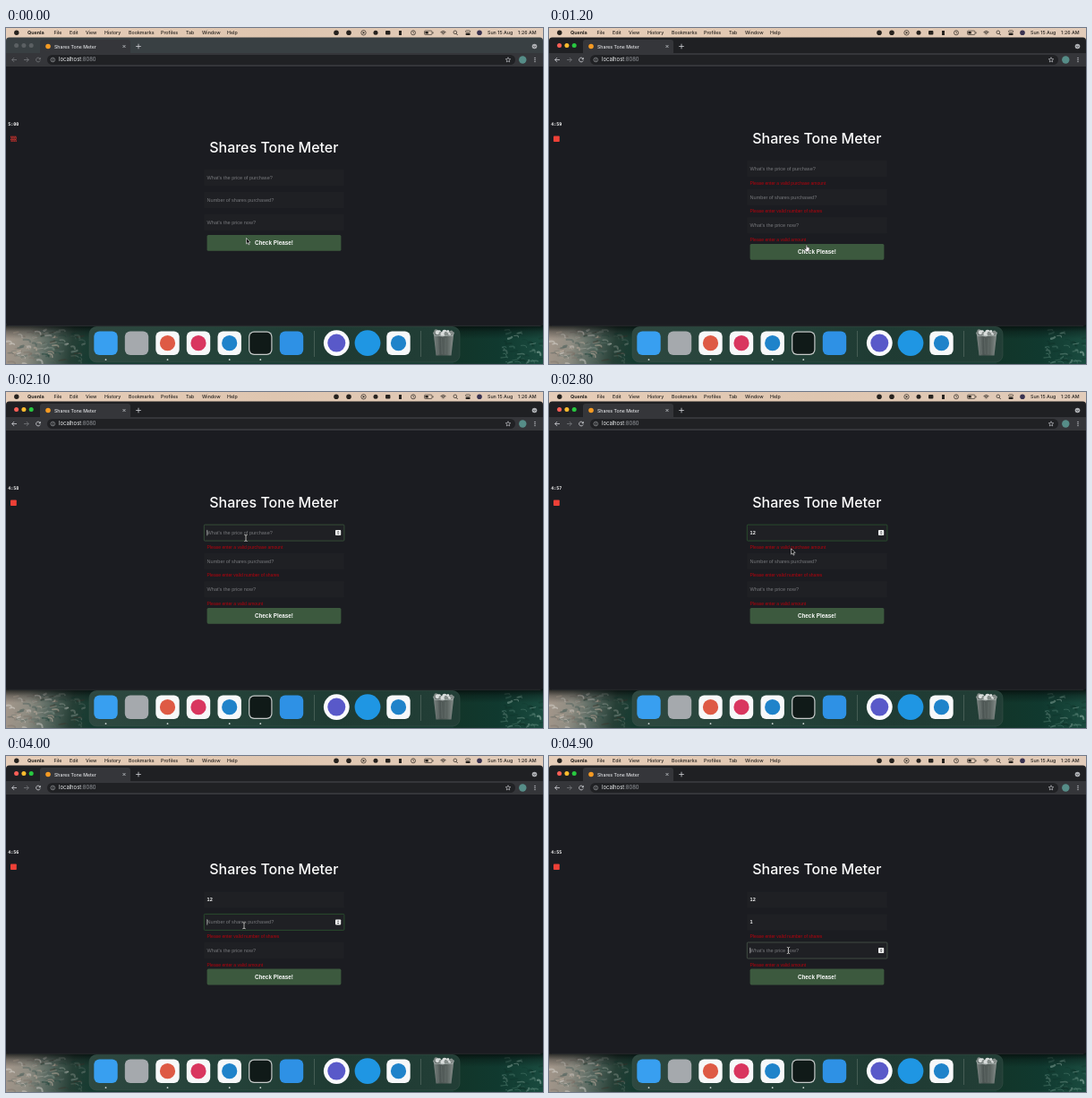
An HTML page with a canvas for the animation above (5000 ms loop, 600 by 375 pixels).

```html
<!DOCTYPE html>
<html lang="en">
<head>
<meta charset="utf-8">
<title>Shares Tone Meter</title>
<style>
html, body { margin: 0; width: 100%; height: 100%; overflow: hidden; background: #1b1c20; }
canvas { display: block; width: 600px; height: 375px; }
</style>
</head>
<body>
<canvas id="stage"></canvas>
<script>
const W = 600, H = 375, LOOP = 5000, STEP = 100;
const UI = 'Inter, "Open Sans", sans-serif';
const FORM = '"Liberation Sans", Arial, sans-serif';
const MONO = '"DejaVu Sans Mono", monospace';
const TITLE = 'Shares Tone Meter';

const canvas = document.getElementById('stage');
const ratio = window.devicePixelRatio || 1;
canvas.width = W * ratio;
canvas.height = H * ratio;
const c = canvas.getContext('2d');

const FIELDS = [
  { hint: "What's the price of purchase?", error: 'Please enter a valid purchase amount' },
  { hint: 'Number of shares purchased?', error: 'Please enter valid number of shares' },
  { hint: "What's the price now?", error: 'Please enter a valid amount' }
];
const SUBMITS = [700, 3200];
const FOCUS = [
  { from: 1900, to: 3200, field: 0 },
  { from: 3700, to: 4800, field: 1 },
  { from: 4800, to: 5000, field: 2 }
];
const KEYS = [
  { at: 2500, field: 0, text: '1' },
  { at: 2700, field: 0, text: '12' },
  { at: 4300, field: 1, text: '1' }
];
// time, x, y of the pointer hot spot
const PATH = [
  [0, 268.5, 234.5], [400, 270.3, 237.5], [700, 287, 241.8], [1300, 288, 242],
  [1800, 268, 163], [2700, 268, 163], [3100, 284.3, 238.2], [3400, 284.3, 238.2],
  [3700, 266, 189], [4400, 266, 189.5], [4700, 267.5, 217], [5000, 267.5, 217]
];

function box(x, y, w, h, r, fill, stroke, lw = 0.6) {
  c.beginPath();
  c.roundRect(x, y, w, h, r);
  if (fill) { c.fillStyle = fill; c.fill(); }
  if (stroke) { c.strokeStyle = stroke; c.lineWidth = lw; c.stroke(); }
}

function dot(x, y, r, fill, stroke, lw = 0.7) {
  c.beginPath();
  c.arc(x, y, r, 0, Math.PI * 2);
  if (fill) { c.fillStyle = fill; c.fill(); }
  if (stroke) { c.strokeStyle = stroke; c.lineWidth = lw; c.stroke(); }
}

function line(points, color, lw = 0.8) {
  c.beginPath();
  points.forEach(([x, y]) => c.lineTo(x, y));
  c.strokeStyle = color;
  c.lineWidth = lw;
  c.stroke();
}

function poly(points, fill, stroke, lw = 0.6) {
  c.beginPath();
  points.forEach(([x, y]) => c.lineTo(x, y));
  c.closePath();
  c.fillStyle = fill;
  c.fill();
  if (stroke) { c.strokeStyle = stroke; c.lineWidth = lw; c.stroke(); }
}

function text(s, x, y, font, color, align = 'left') {
  c.font = font;
  c.fillStyle = color;
  c.textAlign = align;
  c.textBaseline = 'alphabetic';
  c.fillText(s, x, y);
}

function fade(x0, y0, x1, y1, ...colors) {
  const g = c.createLinearGradient(x0, y0, x1, y1);
  colors.forEach((color, i) => g.addColorStop(i / (colors.length - 1), color));
  return g;
}

function random(seed) {
  return () => (seed = (seed * 16807) % 2147483647) / 2147483647;
}

// short wavy strokes scattered over a strip of coast
function foam(seed, count, x, width, colors, alpha) {
  const rnd = random(seed);
  for (let i = 0; i < count; i++) {
    const px = x + rnd() * width, py = 337 + rnd() * 38;
    const dx = 2 + rnd() * 6, dy = rnd() * 6 - 2;
    c.beginPath();
    c.moveTo(px, py);
    c.quadraticCurveTo(px + dx, py - 1, px + dx, py + dy);
    c.strokeStyle = colors[i % colors.length];
    c.lineWidth = 0.6 + rnd() * 1.8;
    c.globalAlpha = alpha * (0.4 + rnd() * 0.6);
    c.stroke();
  }
  c.globalAlpha = 1;
}

function wallpaper() {
  c.fillStyle = '#143a30';
  c.fillRect(0, 325, W, 50);
  c.fillStyle = fade(0, 345, 98, 360, '#a3968a', '#8f8d83', '#56675f', '#263f36', '#143a30');
  c.fillRect(0, 325, 100, 50);
  c.fillStyle = fade(500, 0, W, 0, '#123529', '#10392f', '#1a4b3f');
  c.fillRect(500, 325, 100, 50);
  c.lineCap = 'round';
  foam(71, 60, 0, 52, ['#d6d2cc', '#796e65', '#bfae9f', '#4c605b'], 0.65);
  foam(43, 42, 38, 48, ['#6f8279', '#173d34', '#a2aaa2', '#3d352c'], 0.6);
  foam(29, 44, 553, 45, ['#6f9d8e', '#0f3028', '#a2c0b4'], 0.5);
  c.lineCap = 'butt';
  c.fillStyle = fade(0, 331, 0, 347, 'rgba(4,8,8,0.85)', 'rgba(4,8,8,0.3)', 'rgba(4,8,8,0)');
  c.fillRect(0, 331, W, 16);
}

function menuBar() {
  c.fillStyle = fade(0, 0, W, 0, '#e6cdb8', '#dfc6b0', '#e2ccba');
  c.fillRect(0, 0, W, 16);
  const ink = '#26221e';
  dot(11.8, 5.2, 2.7, ink);
  text('Quenla', 24, 7.1, `700 5.4px ${UI}`, ink);
  [['File', 53.5], ['Edit', 71], ['View', 89], ['History', 110], ['Bookmarks', 137],
   ['Profiles', 173], ['Tab', 201], ['Window', 219], ['Help', 247]]
    .forEach(([s, x]) => text(s, x, 7.1, `500 5.3px ${UI}`, ink));
  dot(369, 5.3, 2.8, ink);
  dot(383, 5.3, 2.8, ink);
  dot(399.5, 5.3, 2.7, null, ink);
  poly([[398.7, 3.9], [401, 5.3], [398.7, 6.7]], ink);
  dot(413, 5.3, 2.5, ink);
  box(424, 3, 5.4, 4.6, 1, ink);
  box(439, 3, 3, 5, 0, ink);
  dot(455, 5.3, 2.5, null, ink);
  line([[455, 3.6], [455, 5.4], [456.2, 6]], ink, 0.6);
  box(467.5, 3.1, 8.5, 4.4, 1, null, ink);
  box(468.4, 4, 3.4, 2.6, 0.4, ink);
  line([[477, 4.5], [477, 6.2]], ink);
  for (const r of [1.2, 2.8, 4.4]) {
    c.beginPath();
    c.arc(488.5, 8, r, -2.3, -0.84);
    c.strokeStyle = ink;
    c.lineWidth = 0.9;
    c.stroke();
  }
  dot(501.8, 4.8, 1.8, null, ink);
  line([[503, 6.2], [504.7, 8]], ink);
  box(513.5, 2.8, 5.2, 2.1, 1, null, ink);
  box(513.5, 5.8, 5.2, 2.1, 1, ink);
  dot(529, 5.3, 2.8, '#393250');
  text('Sun 15 Aug', 538, 7.1, `500 5.3px ${UI}`, ink);
  text('1:26 AM', 592.5, 7.1, `500 5.3px ${UI}`, ink, 'right');
}

function browser(active) {
  box(0, 10.5, W, 322, 3.5, active ? '#1f2023' : '#394043');
  const bar = '#35363a';
  box(38, 13, 101, 18, 3, bar);
  c.fillStyle = bar;
  c.fillRect(0, 28, W, 15);
  const lights = active ? ['#fe5f57', '#febc2e', '#28c840'] : ['#5b6063', '#5b6063', '#5b6063'];
  lights.forEach((color, i) => dot(11.6 + i * 8.3, 19.5, 2.5, color));

  dot(47, 20.5, 2.8, '#f59a23');
  text(TITLE, 54, 22.6, `500 5.2px ${UI}`, '#e0e1e4');
  const ink = '#d2d4d8', dim = '#77797d', nav = active ? ink : dim;
  line([[130.5, 19], [133.5, 22]], ink, 0.7);
  line([[133.5, 19], [130.5, 22]], ink, 0.7);
  line([[145.2, 20.5], [150.8, 20.5]], ink);
  line([[148, 17.7], [148, 23.3]], ink);
  dot(590.5, 20.5, 2.8, '#aeb0b4');
  line([[589.2, 20], [590.5, 21.4], [591.8, 20]], '#303134', 0.7);

  line([[12, 35.5], [6.7, 35.5]], nav);
  line([[9.2, 33], [6.7, 35.5], [9.2, 38]], nav);
  line([[20, 35.5], [25.3, 35.5]], dim);
  line([[22.8, 33], [25.3, 35.5], [22.8, 38]], dim);
  c.beginPath();
  c.arc(36, 35.5, 2.4, 0.4, 5.5);
  c.strokeStyle = nav;
  c.lineWidth = 0.8;
  c.stroke();
  poly([[38.7, 32.7], [38.7, 35.2], [36.3, 35.2]], nav);

  box(46, 30, 523, 11, 5.5, '#202124');
  dot(52.3, 35.5, 2.3, null, '#b2b5b9', 0.6);
  line([[52.3, 35.1], [52.3, 36.8]], '#b2b5b9', 0.6);
  c.fillStyle = '#b2b5b9';
  c.fillRect(52, 34, 0.6, 0.6);
  const font = `400 5.9px ${UI}`;
  text('localhost', 59, 37.4, font, '#eceef0');
  text(':8080', 59 + c.measureText('localhost').width, 37.4, font, '#9a9da2');

  const star = [];
  for (let i = 0; i < 10; i++) {
    const a = -Math.PI / 2 + i * Math.PI / 5, r = i % 2 ? 1.3 : 2.9;
    star.push([561 + r * Math.cos(a), 35.6 + r * Math.sin(a)]);
  }
  poly(star, '#202124', ink, 0.6);
  dot(577.3, 35.5, 4.2, '#568d88');
  for (let i = -1; i < 2; i++) dot(591, 35.5 + i * 2.1, 0.7, ink);

  box(0, 43, W, 289.5, [0, 0, 3.5, 3.5], '#1b1c21');
  line([[3, 332.3], [597, 332.3]], '#3a3e40', 0.4);
}

function dock() {
  box(93, 333.5, 414, 39.5, 8, fade(93, 0, 507, 0, '#2e4840', '#25433a', '#1f3b33', '#223e36'), '#3d544c', 0.5);
  const tile = (x, fill) => box(x - 13.2, 338.5, 26.4, 26.4, 6, fill);
  tile(111.5, '#389ff0');
  tile(146, '#a5a9ad');
  [[180.5, '#de5a45'], [215, '#d9365f'], [249.7, '#1f83ca'], [438.5, '#1f83ca']].forEach(([x, color]) => {
    tile(x, '#f7f8f9');
    dot(x, 351.7, 8.6, color);
  });
  tile(284.3, '#c5c9c8');
  box(272.3, 339.7, 24, 24, 5, '#101a18');
  tile(319, '#2e91e5');
  dot(369.3, 351.6, 14.4, '#fafafd');
  dot(369.3, 351.6, 10, '#5959c9');
  dot(404, 351.6, 14.4, '#1f96e3');
  line([[344.5, 338], [344.5, 367]], '#566c64', 0.7);
  line([[463.5, 338], [463.5, 367]], '#566c64', 0.7);
  [111.5, 180.5, 249.7, 284.3].forEach(x => dot(x, 370.2, 0.9, '#d0d8d5'));

  // bin with crumpled paper
  poly([[477.5, 339], [500.5, 339], [497.5, 365.5], [480.5, 365.5]],
    fade(478, 0, 500, 0, '#7d8583', '#4c5553', '#59625f', '#858d8a'));
  for (let i = 0; i < 4; i++) line([[482 + i * 4.6, 346], [483.5 + i * 3.7, 364]], '#69736f', 0.6);
  const rnd = random(19);
  for (let i = 0; i < 10; i++) {
    dot(480.5 + i * 1.9, 338.5 + rnd() * 3.5, 1.5 + rnd() * 1.4, i % 3 ? '#d9dddc' : '#858d8a');
  }
  line([[477.5, 340], [479, 343.5], [499, 343.5], [500.5, 340]], '#aab3b0', 0.7);
}

function recorder(t) {
  const left = 300 - Math.max(0, Math.floor((t + 300) / 1000));
  const clock = Math.floor(left / 60) + ':' + String(left % 60).padStart(2, '0');
  text(clock, 2.2, 108.7, `700 5.05px ${MONO}`, '#f5f5f5');
  if (t >= STEP) {
    box(5, 120.5, 6.8, 6.6, 0.8, '#ee4037');
    return;
  }
  box(5, 120.5, 6.8, 6.6, 0.8, '#551f21');
  c.fillStyle = '#d93c36';
  for (let i = 0; i < 16; i++) {
    const row = i >> 2;
    c.fillRect(5.1 + (i % 4) * 1.7 + (row % 2) * 0.7, 120.8 + row * 1.6, 1, 1);
  }
}

function layout(t) {
  const values = ['', '', ''];
  KEYS.forEach(k => { if (t >= k.at) values[k.field] = k.text; });
  const bad = FIELDS.map((_, i) => t >= SUBMITS[1] ? i > 0 : t >= SUBMITS[0]);
  const extra = 6.6 * bad.filter(Boolean).length;
  const titleY = 133 - extra / 2;
  let y = titleY + 34;
  const rows = bad.map(b => {
    const row = y;
    y += 25 + (b ? 6.6 : 0);
    return row;
  });
  return { values, bad, titleY, rows, button: y - 2.1 };
}

function form(t, f) {
  text(TITLE, 299.3, f.titleY + 5.8, `500 16px ${UI}`, '#fdfdfd', 'center');
  const focus = FOCUS.find(s => t >= s.from && t < s.to);
  f.rows.forEach((y, i) => {
    const on = focus && focus.field === i;
    box(221.3, y - 9, 156.6, 18, 1, '#1f2024');
    if (on) {
      const k = Math.min(1, (t - focus.from) / 300);
      const mix = (a, b) => Math.round(a + (b - a) * k);
      box(221.3, y - 9, 156.6, 18, 1, null, `rgb(${mix(88, 45)},${mix(88, 86)},${mix(88, 48)})`, 0.8);
      box(368, y - 3, 6.2, 6, 0.8, '#f1f1f1');
      poly([[369.7, y - 0.6], [372.5, y - 0.6], [371.1, y - 2]], '#44464a');
      poly([[369.7, y + 0.6], [372.5, y + 0.6], [371.1, y + 2]], '#44464a');
    }
    const value = f.values[i], font = `${value ? 700 : 400} 5.56px ${FORM}`;
    text(value || FIELDS[i].hint, 224.6, y + 2, font, value ? '#f2f2f2' : '#77787c');
    if (on && (t - focus.from) % 1000 < 500) {
      const x = 224.8 + (value ? c.measureText(value).width : 0);
      line([[x, y - 3.2], [x, y + 3.2]], '#e4e4e4', 0.6);
    }
    if (f.bad[i]) text(FIELDS[i].error, 224.6, y + 17.6, `400 5.05px ${FORM}`, '#b8000c');
  });
  box(224.6, f.button - 8.9, 149.8, 17.8, 1.6, '#3c593e');
  text('Check Please!', 299.4, f.button + 2.3, `700 6.35px ${FORM}`, '#f7f8f7', 'center');
}

function pointer(t, f) {
  const i = Math.max(1, PATH.findIndex(p => p[0] > t));
  const [t0, x0, y0] = PATH[i - 1], [t1, x1, y1] = PATH[i];
  const u = (t - t0) / (t1 - t0), k = u * u * (3 - 2 * u);
  const x = x0 + (x1 - x0) * k, y = y0 + (y1 - y0) * k;
  const overField = f.rows.some(row => Math.abs(y - row) < 9);
  const overButton = Math.abs(y - f.button) < 9;

  c.save();
  c.translate(x, y);
  if (t >= 600 && overField) {
    for (const [color, lw] of [['#111', 1.7], ['#e6e6e6', 0.8]]) {
      line([[-1.7, -3.6], [0, -3], [1.7, -3.6]], color, lw);
      line([[0, -3], [0, 3]], color, lw);
      line([[-1.7, 3.6], [0, 3], [1.7, 3.6]], color, lw);
    }
  } else if (t >= 600 && overButton) {
    poly([[-0.7, 0], [0.5, 0], [0.7, 2.5], [3, 3.1], [3.2, 5], [2.3, 7.4], [-0.9, 7.4], [-2.8, 4.6], [-2.2, 4], [-0.8, 4.8]],
      '#f5f5f5', '#151515', 0.5);
  } else {
    poly([[0, 0], [0, 6.4], [1.5, 5.1], [2.5, 7.4], [3.6, 6.9], [2.6, 4.7], [4.6, 4.6]], '#0b0b0b', '#f2f2f2', 0.6);
  }
  c.restore();
}

function draw(t) {
  c.setTransform(ratio, 0, 0, ratio, 0, 0);
  const f = layout(t);
  wallpaper();
  menuBar();
  browser(t >= STEP);
  dock();
  recorder(t);
  form(t, f);
  pointer(t, f);
}

const start = performance.now();
function tick() {
  const t = (performance.now() - start) % LOOP;
  draw(Math.floor(t / STEP) * STEP);
  requestAnimationFrame(tick);
}
tick();
</script>
</body>
</html>
```
